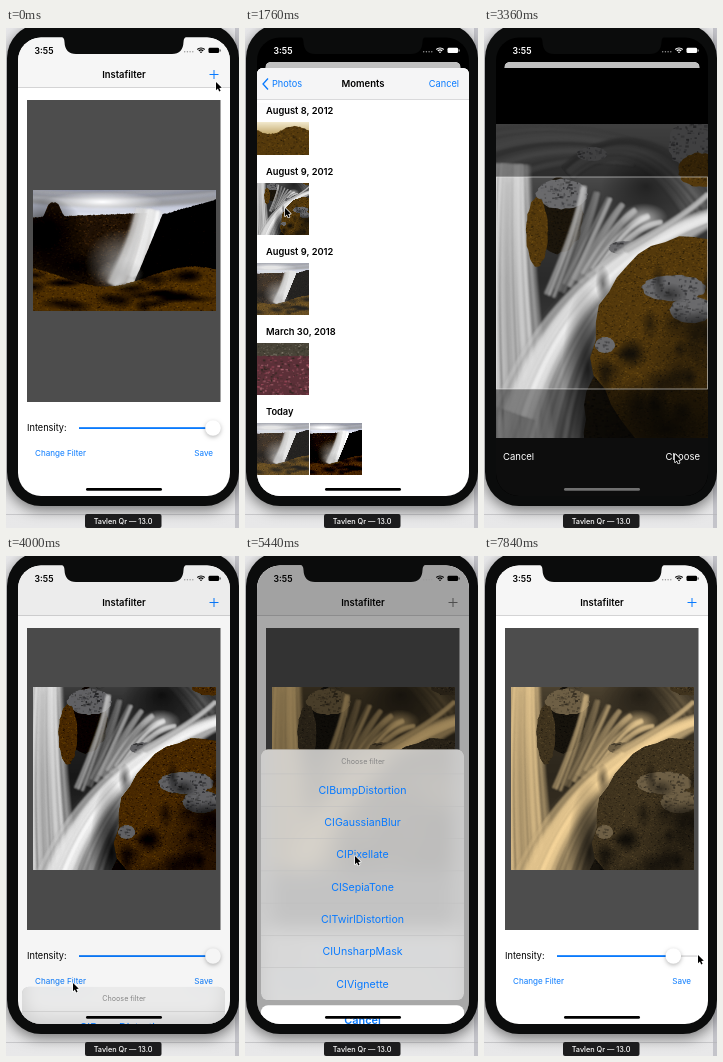
Write an HTML page with a canvas that moves like this. It is 233 px wide and 500 px high and loops after 8000 ms.

```html
<!DOCTYPE html>
<html lang="en">
<head>
<meta charset="utf-8">
<title>Photo filter demo</title>
<style>
  html, body { margin: 0; width: 100%; height: 100%; overflow: hidden; background: #e2e2e4; }
  canvas { display: block; width: 233px; height: 500px; }
</style>
</head>
<body>
<canvas id="stage"></canvas>
<script>
const W = 233, H = 500, LOOP = 8000, STEP = 160;
const BLUE = '#087aff', FONT = 'Inter, "Open Sans", sans-serif';
const canvas = document.getElementById('stage');
const dpr = window.devicePixelRatio || 1;
canvas.width = W * dpr;
canvas.height = H * dpr;
const ctx = canvas.getContext('2d');

// ---------- helpers ----------
let seed = 7;
const rnd = () => (seed = (seed * 16807) % 2147483647) / 2147483647;
const mix = (a, b, k) => a + (b - a) * k;
const between = (a, b) => mix(a, b, rnd());
const pick = list => list[Math.floor(rnd() * list.length)];
const clamp = (v, lo, hi) => Math.min(hi, Math.max(lo, v));
const ramp = (t, a, b) => {
  const k = clamp((t - a) / (b - a), 0, 1);
  return k * k * (3 - 2 * k);
};
function scoped(c, draw) { c.save(); draw(); c.restore(); }
function rect(x, y, w, h, color) { ctx.fillStyle = color; ctx.fillRect(x, y, w, h); }
function roundPath(x, y, w, h, r) { ctx.beginPath(); ctx.roundRect(x, y, w, h, r); }
function round(x, y, w, h, r, color) { roundPath(x, y, w, h, r); ctx.fillStyle = color; ctx.fill(); }
function line(color, width, ...points) {
  ctx.beginPath();
  points.forEach(p => ctx.lineTo(...p));
  ctx.strokeStyle = color;
  ctx.lineWidth = width;
  ctx.stroke();
}
function text(s, x, y, size, color = '#000', align = 'left', weight = 400) {
  ctx.font = `${weight} ${size}px ${FONT}`;
  ctx.textAlign = align;
  ctx.textBaseline = 'middle';
  ctx.fillStyle = color;
  ctx.fillText(s, x, y + 0.4);
}
function gradient(c, w, h, ...colors) {
  const g = c.createLinearGradient(0, 0, 0, h);
  colors.forEach((v, i) => g.addColorStop(i / (colors.length - 1), v));
  c.fillStyle = g;
  c.fillRect(0, 0, w, h);
}

// ---------- picture brushes ----------
const GOLD = ['#6b4a10', '#54390c', '#7c5817', '#36250a', '#1c1407'];
const MOSS = ['#4a331a', '#2c2015', '#5f4120', '#120d08'];
const STONE = ['#4c4c4e', '#6a6a6c', '#38383a', '#29292b'];
const DARK = ['#100d09', '#1c160c', '#2b1f0c', '#080705'];

function picture(w, h, draw) {
  const c = document.createElement('canvas');
  c.width = w * 2;
  c.height = h * 2;
  const g = c.getContext('2d');
  g.scale(2, 2);
  draw(g);
  return c;
}
// Soft grey ellipse.
function glow(c, x, y, rx, ry, level, alpha) {
  scoped(c, () => {
    c.translate(x, y);
    c.scale(rx, ry);
    const g = c.createRadialGradient(0, 0, 0, 0, 0, 1);
    g.addColorStop(0, `rgba(${level},${level},${level},${alpha})`);
    g.addColorStop(1, `rgba(${level},${level},${level},0)`);
    c.fillStyle = g;
    c.fillRect(-1, -1, 2, 2);
  });
}
// Fills the current path with one colour and fine grains of the palette.
function grains(c, x, y, w, h, colors, size) {
  scoped(c, () => {
    c.clip();
    c.fillStyle = colors[1];
    c.fillRect(x, y, w, h);
    for (let i = w * h / (size * size * 3); i > 0; i--) {
      c.fillStyle = pick(colors);
      c.globalAlpha = between(0.2, 0.8);
      c.fillRect(between(x, x + w), between(y, y + h), size * between(0.5, 2), size * between(0.5, 1.3));
    }
  });
}
function rock(c, x, y, rx, ry, colors, size = 1) {
  c.beginPath();
  for (let a = 0; a < 6.28; a += 0.16) {
    const r = between(0.95, 1.04);
    c.lineTo(x + rx * r * Math.cos(a), y + ry * r * Math.sin(a));
  }
  grains(c, x - rx * 1.1, y - ry * 1.1, rx * 2.2, ry * 2.2, colors, size);
}
// Land below the curve y = height(x).
function ridge(c, w, h, height, colors, size = 1) {
  c.beginPath();
  c.moveTo(0, h);
  for (let x = 0; x <= w; x++) c.lineTo(x, height(x) + rnd());
  c.lineTo(w, h);
  grains(c, 0, 0, w, h, colors, size);
}
// Blurred strands of water along a curve that widens from w0 to w1.
function flow(c, a, b, d, w0, w1, level, count = 70) {
  const side = (p, from, to, s) => {
    const dx = to[0] - from[0], dy = to[1] - from[1], l = Math.hypot(dx, dy);
    return [p[0] - dy / l * s, p[1] + dx / l * s];
  };
  scoped(c, () => {
    c.filter = 'blur(2px)';
    for (let i = 0; i < count; i++) {
      const k = rnd() - 0.5, v = clamp(level + between(-40, 30), 0, 250);
      c.strokeStyle = `rgba(${v},${v},${v},${0.42 - 1.3 * k * k})`;
      c.lineWidth = between(1, 2 + (w0 + w1) / 25);
      c.beginPath();
      c.moveTo(...side(a, a, b, k * w0));
      c.quadraticCurveTo(...side(b, a, d, k * (w0 + w1) / 2), ...side(d, b, d, k * w1));
      c.stroke();
    }
  });
}

// ---------- pictures ----------
const river = picture(212, 314, c => {
  gradient(c, 212, 314, '#6a6a6a', '#3a3a3a', '#2a2a2a', '#404040', '#505050');
  flow(c, [0, 35], [60, 12], [140, 30], 60, 24, 105);
  flow(c, [72, 48], [140, -12], [208, 85], 16, 44, 92);
  glow(c, 150, 62, 45, 34, 20, 0.7);
  rock(c, 206, 20, 34, 28, STONE, 2);
  rock(c, 204, 46, 22, 17, GOLD);
  rock(c, 96, 30, 15, 7, STONE, 2);
  flow(c, [15, 40], [10, 150], [22, 320], 36, 70, 222);
  rock(c, 62, 92, 25, 38, DARK);
  rock(c, 66, 70, 26, 15, STONE, 2);
  rock(c, 41, 108, 11, 34, GOLD);
  for (let i = 0; i < 7; i++) {
    flow(c, [88 + i * 13, 62 + i * 6], [84 + i * 9, 100], [54 + i * 9, 172 - i * 5], 5, 13, between(150, 215), 16);
  }
  rock(c, 128, 124, 15, 7, STONE, 2);
  glow(c, 148, 94, 24, 15, 230, 0.7);
  flow(c, [216, 92], [70, 150], [30, 325], 15, 105, 185);
  flow(c, [216, 92], [74, 138], [22, 290], 8, 48, 235, 60);
  flow(c, [212, 70], [190, 92], [130, 126], 5, 10, 190, 20);
  glow(c, 92, 245, 26, 85, 12, 0.85);
  rock(c, 166, 300, 79, 85, DARK, 1.5);
  rock(c, 190, 222, 93, 110, GOLD);
  rock(c, 178, 164, 32, 13, STONE, 2);
  rock(c, 196, 186, 22, 13, STONE, 2);
  rock(c, 109, 221, 10, 8, STONE, 2);
  for (let i = 0; i < 22; i++) glow(c, between(105, 212), between(150, 290), between(4, 20), between(8, 24), 8, 0.55);
  glow(c, 170, 305, 110, 62, 6, 0.85);
  glow(c, 205, 235, 65, 50, 6, 0.5);
});

const falls = picture(183, 121, c => {
  gradient(c, 183, 121, '#8f94a8', '#dfe2eb', '#a5a5b4', '#2c2418', '#171006');
  flow(c, [0, 6], [80, 14], [183, 2], 14, 20, 165, 25);
  glow(c, 70, 12, 60, 10, 250, 0.9);
  ridge(c, 118, 121, x => 27 - x * 0.04 - 14 * Math.exp(-(((x - 21) / 8) ** 4)), MOSS);
  glow(c, 12, 45, 42, 38, 4, 1);
  glow(c, 45, 76, 50, 22, 8, 0.8);
  glow(c, 92, 72, 40, 34, 155, 0.85);
  flow(c, [117, 20], [112, 55], [92, 100], 28, 38, 215, 60);
  flow(c, [121, 20], [116, 50], [104, 88], 16, 20, 240, 30);
  ridge(c, 183, 121, x => x > 130 ? 24 - (x - 130) * 0.28 : 24 + (130 - x) * 2.4, ['#0b0a09', '#0d0b09', '#1e1915', '#050505']);
  ridge(c, 183, 121, x => 86 + 10 * Math.sin(x / 28 - 1), GOLD);
  for (let i = 0; i < 24; i++) glow(c, between(0, 183), between(85, 121), between(8, 24), between(3, 9), 6, 0.7);
  glow(c, 88, 84, 25, 15, 175, 0.7);
});

const valley = picture(52, 52, c => {
  gradient(c, 52, 52, '#c9ccd4', '#faf5df', '#b99b55', '#49350f');
  ridge(c, 52, 52, x => 27 + 4 * Math.sin(x / 8), GOLD);
});

const flowers = picture(52, 52, c => {
  ridge(c, 52, 52, () => -1, ['#2a2c22', '#4a4539', '#8d8678', '#3a3328']);
  ridge(c, 52, 52, () => 13, ['#a04a5c', '#5c3038', '#b8707c', '#2b261e'], 1.5);
});

function squareFalls(x, y, size, filter = 'none') {
  ctx.filter = filter;
  ctx.drawImage(falls, 76, 0, 242, 242, x, y, size, size);
  ctx.filter = 'none';
}
function squareRiver(x, y, size) { ctx.drawImage(river, 0, 106, 424, 424, x, y, size, size); }

// ---------- screens ----------
function drawSlider(x) {
  rect(73, 399.2, 141, 1.8, '#dfdfe0');
  rect(73, 399.2, x - 73, 1.8, BLUE);
  scoped(ctx, () => {
    ctx.shadowColor = 'rgba(0,0,0,.28)';
    ctx.shadowBlur = 4 * dpr;
    ctx.shadowOffsetY = 1.5 * dpr;
    round(x - 7.8, 392.2, 15.6, 15.6, 7.8, '#fff');
  });
}

function drawEditor(t, thumb, tint) {
  rect(12, 9, 212, 460, '#fff');
  rect(12, 9, 212, 50, '#f6f6f6');
  rect(12, 59, 212, 0.6, '#b7b7b9');
  text('Instafilter', 118, 46.5, 9.4, '#000', 'center', 600);
  line(tint, 1, [203.5, 46.5], [212.5, 46.5]);
  line(tint, 1, [208, 42], [208, 51]);
  rect(21, 72, 193.5, 302, '#4d4d4d');
  if (t < 3360) {
    ctx.filter = 'contrast(1.15)';
    ctx.drawImage(falls, 26.5, 162, 183, 121);
  } else {
    const sepia = (thumb - 81) / 126;
    ctx.filter = t < 5440 ? 'contrast(1.2)' : `brightness(${1 - 0.27 * sepia}) sepia(${sepia}) saturate(${1 + sepia * 0.5})`;
    squareRiver(26.5, 131, 183);
  }
  ctx.filter = 'none';
  text('Intensity:', 21, 400, 9.2);
  drawSlider(thumb);
  text('Change Filter', 29, 425, 8.1, BLUE);
  text('Save', 207, 425, 8.1, BLUE, 'right');
}

function drawAlbums(t) {
  rect(12, 40, 212, 430, '#fff');
  if (t >= 960) rect(12, 72, 212, 50, '#c9c9cb');
  ['Moments', 'All Photos', 'Recents'].forEach((name, i) => {
    const y = 97 + i * 51;
    squareFalls(18, y - 21, 37.5, 'brightness(.75)');
    squareFalls(16, y - 19, 39.5);
    text(name, 65, i ? y - 5 : y - 1, 8.2);
    if (i) text('8', 65, y + 6, 8, '#777');
    rect(65, y + 25, 159, 0.5, '#d8d8da');
  });
  text('My Albums', 16, 238, 10, '#000', 'left', 600);
}

const PALE = 'brightness(1.2) contrast(.8)';
const moments = [
  ['August 8, 2012', y => ctx.drawImage(valley, 12, y, 52, 52)],
  ['August 9, 2012', y => squareRiver(12, y, 52)],
  ['August 9, 2012', y => squareFalls(12, y, 52, PALE)],
  ['March 30, 2018', y => ctx.drawImage(flowers, 12, y, 52, 52)],
  ['Today', y => { squareFalls(12, y, 52, PALE); squareFalls(65, y, 52, 'contrast(1.3)'); }]
];
function drawMoments() {
  rect(12, 40, 212, 430, '#fff');
  moments.forEach(([label, photo], i) => {
    photo(74.5 + i * 80);
    if (i == 0) rect(12, 72, 212, 22, 'rgba(255,255,255,.94)');
    text(label, 21, Math.max(83, 63.5 + i * 80), 9.3, '#000', 'left', 600);
  });
}

function drawCrop() {
  rect(12, 40, 212, 430, '#000');
  ctx.drawImage(river, 12, 96, 212, 314);
  rect(12, 96, 212, 53, 'rgba(0,0,0,.4)');
  rect(12, 361, 212, 49, 'rgba(0,0,0,.4)');
  ctx.strokeStyle = 'rgba(225,225,225,.75)';
  ctx.lineWidth = 0.8;
  ctx.strokeRect(12.4, 149, 211.2, 212);
  rect(12, 410, 212, 60, '#0d0d0d');
  text('Cancel', 19, 428.5, 9.5, '#fff');
  text('Choose', 216, 428.5, 9.5, '#fff', 'right');
}

function shifted(dx, draw) {
  scoped(ctx, () => { ctx.translate(dx, 0); draw(); });
}

function drawPicker(t, open) {
  const push = ramp(t, 960, 1280), crop = ramp(t, 1760, 2240);
  scoped(ctx, () => {
    ctx.translate(0, (1 - open) * 430);
    roundPath(12, 40, 212, 440, [6, 6, 0, 0]);
    ctx.clip();
    if (crop < 1) {
      shifted(-66 * push, () => drawAlbums(t));
      rect(12, 72, 212, 400, `rgba(0,0,20,${0.16 * push})`);
      if (push > 0) shifted(212 * (1 - push) - 64 * crop, drawMoments);
      rect(12, 40, 212, 32, '#f5f5f6');
      rect(12, 71.5, 212, 0.5, '#bcbcbe');
      ctx.globalAlpha = 1 - push;
      text('Photos', 118 - 68 * push, 56, 9.5, '#000', 'center', 600);
      ctx.globalAlpha = push;
      text('Moments', 118 + 100 * (1 - push), 56, 9.5, '#000', 'center', 600);
      ctx.globalAlpha = Math.min(1, push * 2);
      line(BLUE, 1.3, [23, 50.5], [18, 56], [23, 61.5]);
      ctx.globalAlpha = ramp(t, 1120, 1440);
      text('Photos', 27, 56, 9.2, BLUE);
      ctx.globalAlpha = 1;
      rect(181, 41, 42, 29, '#f5f5f6');
      text('Cancel', 214, 56, 9.2, BLUE, 'right');
    }
    if (crop > 0) shifted(212 * (1 - crop), drawCrop);
  });
}

const filters = ['BumpDistortion', 'GaussianBlur', 'Pixellate', 'SepiaTone', 'TwirlDistortion', 'UnsharpMask', 'Vignette'];
function drawFilterMenu(open) {
  rect(12, 9, 212, 460, `rgba(0,0,0,${0.38 * open})`);
  const dy = (1 - open) * 300;
  scoped(ctx, () => {
    roundPath(16, 162 + dy, 203, 251, 7);
    ctx.clip();
    ctx.filter = `blur(${10 * dpr}px)`;
    ctx.drawImage(canvas, 0, 0, W, H);
    ctx.filter = 'none';
    ctx.translate(0, dy);
    rect(16, 162, 203, 251, 'rgba(232,232,232,.8)');
    text('Choose filter', 118, 174, 7.2, '#858585', 'center');
    filters.forEach((name, i) => {
      rect(16, 186.5 + i * 32.3, 203, 0.5, '#bdbdbd');
      text('CI' + name, 117.5, 203 + i * 32.3, 10.6, BLUE, 'center');
    });
  });
  round(16, 418 + dy, 203, 31.5, 7, '#fff');
  text('Cancel', 117.5, 433.5 + dy, 10.9, BLUE, 'center', 600);
}

function drawStatus(color, indicator) {
  text('3:55', 38, 22.5, 8.7, color, 'center', 600);
  for (let i = 0; i < 4; i++) round(178 + i * 2.7, 23, 1.4, 1.4, 0.7, '#999');
  ctx.strokeStyle = color;
  ctx.lineWidth = 1.2;
  for (let r = 1; r < 6; r += 2.1) {
    ctx.beginPath();
    ctx.arc(195, 25.2, r, -Math.PI * 0.75, -Math.PI * 0.25);
    ctx.stroke();
  }
  round(202.5, 19.8, 10.6, 5.3, 1.4, color);
  rect(213.7, 21.5, 0.8, 2, color);
  round(80, 460, 76, 2.8, 1.4, indicator);
}

function drawBody() {
  gradient(ctx, W, H, '#e9e9eb', '#dedee0', '#e8e8e9');
  rect(229, 0, 4, H, '#c4c4ca');
  rect(0, 486, W, 0.6, '#b5b5b8');
  scoped(ctx, () => {
    ctx.shadowColor = 'rgba(0,0,0,.5)';
    ctx.shadowBlur = 14 * dpr;
    ctx.shadowOffsetY = 4 * dpr;
    round(1, -4, 232, 482, 34, '#0b0c0c');
  });
}

function drawNotch() {
  for (const side of [-1, 1]) {
    scoped(ctx, () => {
      ctx.translate(118, 0);
      ctx.scale(side, 1);
      ctx.beginPath();
      ctx.moveTo(-1, 8);
      ctx.lineTo(64, 8);
      ctx.quadraticCurveTo(59.5, 9, 59.5, 14);
      ctx.quadraticCurveTo(59, 26, 48, 26);
      ctx.lineTo(-1, 26);
      ctx.fillStyle = '#0b0c0c';
      ctx.fill();
    });
  }
}

const arrow = new Path2D('M0 0V8.2L1.9 6.5 3.2 9.4 4.6 8.8 3.3 6 5.8 5.8Z');
function drawCursor({ x, y }) {
  scoped(ctx, () => {
    ctx.translate(x, y);
    ctx.lineJoin = 'round';
    ctx.lineWidth = 1.4;
    ctx.strokeStyle = '#fff';
    ctx.stroke(arrow);
    ctx.fillStyle = '#000';
    ctx.fill(arrow);
  });
}

// ---------- timeline ----------
// The pointer rests on each control from `arrive` to `leave`.
const stops = [
  { arrive: 0, leave: 160, x: 210, y: 54 },      // add button
  { arrive: 800, leave: 1120, x: 56, y: 100 },   // Moments row
  { arrive: 1600, leave: 1760, x: 40, y: 180 },  // photo
  { arrive: 2880, leave: 3520, x: 191, y: 426 }, // Choose
  { arrive: 3920, leave: 4480, x: 67, y: 427 },  // Change Filter
  { arrive: 5120, leave: 5440, x: 110, y: 300 }, // sepia entry
  { arrive: 5760, leave: 5920, x: 209, y: 400 }, // slider, full
  { arrive: 6400, leave: 6560, x: 89, y: 400 },  // slider, low
  { arrive: 7840, leave: 8000, x: 214, y: 399 }  // slider, high
];
function pointerAt(t) {
  const i = stops.findLastIndex(s => s.arrive <= t);
  const from = stops[i], to = stops[i + 1] || from;
  const k = clamp((t - from.leave) / (to.arrive - from.leave || 1), 0, 1);
  return { x: mix(from.x, to.x, k), y: mix(from.y, to.y, k) };
}
// While dragged, the thumb trails the pointer by one step.
function thumbAt(t) {
  const lagged = t - STEP;
  return lagged <= 5920 ? 207 : 92 + (pointerAt(lagged).x - 89) * 0.89;
}

function render(t) {
  const sheet = ramp(t, 160, 640) - ramp(t, 3360, 3840);
  const menu = ramp(t, 3920, 4320) - ramp(t, 5360, 5760);
  ctx.setTransform(dpr, 0, 0, dpr, 0, 0);
  drawBody();
  scoped(ctx, () => {
    roundPath(12, 9.5, 212, 458.5, 23);
    ctx.clip();
    rect(12, 9, 212, 460, '#000');
    scoped(ctx, () => {
      const scale = 1 - 0.08 * sheet;
      ctx.translate(118, 9 + 25 * sheet);
      ctx.scale(scale, scale);
      ctx.translate(-118, -9);
      roundPath(12, 9, 212, 460, 6 * sheet);
      ctx.clip();
      drawEditor(t, thumbAt(t), menu > 0.3 ? '#777' : BLUE);
      rect(12, 9, 212, 460, `rgba(0,0,0,${0.22 * sheet})`);
    });
    if (sheet > 0) drawPicker(t, sheet);
    if (menu > 0) drawFilterMenu(menu);
    const cropping = t >= 2000 && sheet > 0.5;
    drawStatus(sheet > 0.5 ? '#fff' : '#000', cropping ? '#707070' : '#000');
  });
  drawNotch();
  round(79, 486, 76.5, 14, 2, '#1c1c1d');
  text('Tavlen Qr — 13.0', 117, 493, 7.3, '#fff', 'center', 500);
  drawCursor(pointerAt(t));
}

function tick(now) {
  render(Math.floor((now % LOOP) / STEP) * STEP);
  requestAnimationFrame(tick);
}
requestAnimationFrame(tick);
</script>
</body>
</html>
```
